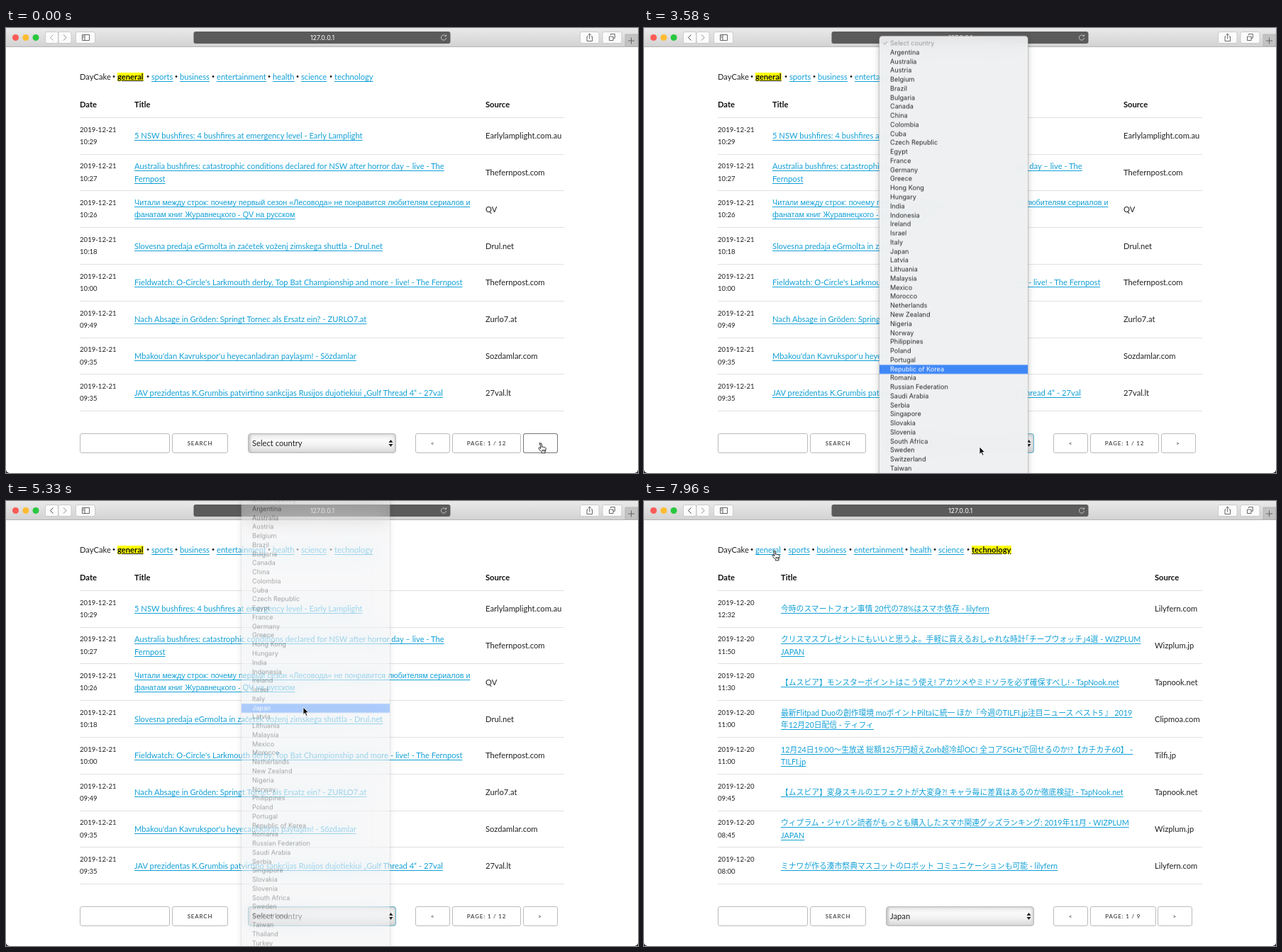
Recreate the animation shown at these times as an HTML page. Size 891 px wide and 628 px high, loop 8000 ms.

```html
<!DOCTYPE html>
<html lang="en">
<head>
<meta charset="utf-8">
<title>News reader</title>
<style>
html, body { margin: 0; width: 100%; height: 100%; overflow: hidden; background: #222; }
#stage {
  --h: 12.77px;
  position: relative; width: 891px; height: 628px; overflow: hidden;
  background: #fff; border-radius: 0 0 5px 5px; color: #222;
  font: 11.2px/17.2px Lato, "Noto Sans CJK JP", sans-serif;
}
#stage * { box-sizing: border-box; }
#stage div, #stage span, #stage svg { position: absolute; }
#stage span { white-space: pre; }
.page { inset: 0; visibility: hidden; }
.page, .hot, .ring, .arrow, .hand { animation: 8s step-end infinite; }
.rule { left: 104px; width: 682.5px; height: 1px; background: #e1e1e1; }
.link { color: #12a0d7; text-decoration: underline 1px; text-underline-offset: 1.5px; }
.cjk { font-size: 10.8px; }
.alt { font: 10.8px/17.2px "Liberation Sans", Arial, sans-serif; }
.date { font-size: 9.6px; }
.dot { font-size: 8px; }
.bold { font-weight: 700; color: #111; }
.active { font-weight: 700; color: #111; background: #ff0; line-height: 12px; margin-top: 2.6px; text-decoration: underline 1px; }
.box { border: 1px solid #bbb; border-radius: 3px; top: 572px; height: 28px; }
.btn { font-size: 7.9px; font-weight: 700; letter-spacing: .85px; color: #555; text-align: center; line-height: 27px; }
.select {
  left: 341px; top: 572px; width: 209px; height: 28px; border-radius: 4px; border: 1px solid #b9b9b9;
  background: linear-gradient(#e8e8e8, #fafafa 32%, #f1f1f1 62%, #d9d9d9);
  box-shadow: inset 3px 0 3px #c9c9c9, inset -2px 0 3px #d2d2d2;
}
.hot { top: 572px; width: 49px; height: 28px; border: 1px solid #777; border-radius: 3px; }
.ring { left: 341px; top: 572px; width: 209px; height: 28px; border-radius: 4px; border: 1.5px solid #62b9d5; animation-name: ring; }

.p0 { animation-name: p0; } .p1 { animation-name: p1; } .p2 { animation-name: p2; } .p3 { animation-name: p3; }
@keyframes p0 { 0% { visibility: visible } 4.75% { visibility: hidden } 24.5% { visibility: visible } 70%, 100% { visibility: hidden } }
@keyframes p1 { 0% { visibility: hidden } 4.75% { visibility: visible } 24.5%, 100% { visibility: hidden } }
@keyframes p2 { 0% { visibility: hidden } 70% { visibility: visible } 80.25%, 100% { visibility: hidden } }
@keyframes p3 { 0% { visibility: hidden } 80.25%, 100% { visibility: visible } }
@keyframes next { 0% { opacity: 1 } 7.5%, 100% { opacity: 0 } }
@keyframes prev { 0% { opacity: 0 } 15.2% { opacity: 1 } 26%, 100% { opacity: 0 } }
@keyframes ring { 0% { opacity: 0 } 36.5% { opacity: 1 } 70%, 100% { opacity: 0 } }

.progress {
  left: 264.5px; top: 20px; width: 362px; height: 2px; background: #eee; border-radius: 0 0 3px 3px;
  transform-origin: left; animation: load 8s linear infinite;
}
@keyframes load {
  0%, .5% { transform: scaleX(0); opacity: 1 }
  1.6%, 4.7% { transform: scaleX(.12); opacity: 1 }
  6.5%, 8% { transform: none; opacity: 1 }
  9%, 24.4% { transform: none; opacity: 0 }
  24.5% { transform: scaleX(.12); opacity: 1 }
  26.5%, 28% { transform: none; opacity: 1 }
  29%, 67.6% { transform: none; opacity: 0 }
  67.7% { transform: scaleX(.12); opacity: 1 }
  71.5%, 73.5% { transform: none; opacity: 1 }
  74.5%, 80.2% { transform: none; opacity: 0 }
  80.25% { transform: scaleX(.12); opacity: 1 }
  82.5%, 84% { transform: none; opacity: 1 }
  85%, 100% { transform: none; opacity: 0 }
}

.menu {
  left: 332px; top: 577px; width: 209px; height: 720px; padding-top: 4px; border-radius: 4px;
  background: rgba(238, 239, 240, .92); backdrop-filter: blur(14px);
  box-shadow: 0 0 0 .5px #aaa, 0 3px 10px #0004;
  font: 9.1px/var(--h) Inter, Roboto, sans-serif; color: #2a2a2a;
  animation: slide 8s infinite, show 8s linear infinite;
}
.list { left: 0; width: 100%; white-space: pre; padding-left: 15px; height: calc(55 * var(--h)); }
.off { color: #999; font-weight: 400; }
.tick { left: 4px; }
.lit { background: #3f87f7; color: #fff; animation: pick 8s infinite; }
@keyframes slide {
  0%, 37.2% { transform: none; animation-timing-function: ease-in-out }
  46%, 100% { transform: translateY(-588.7px) }
}
@keyframes show { 0%, 36.49% { opacity: 0 } 36.5%, 66% { opacity: 1 } 67.1%, 100% { opacity: 0 } }
@keyframes pick {
  0%, 38.3% { clip-path: inset(0 0 calc(55 * var(--h))); animation-timing-function: step-end }
  38.4% { clip-path: inset(var(--h) 0 calc(53 * var(--h))); animation-timing-function: steps(45) }
  46.5% { clip-path: inset(calc(46 * var(--h)) 0 calc(8 * var(--h))); animation-timing-function: steps(11) }
  51.4%, 51.8% { clip-path: inset(calc(35 * var(--h)) 0 calc(19 * var(--h))); animation-timing-function: steps(12) }
  58%, 100% { clip-path: inset(calc(23 * var(--h)) 0 calc(31 * var(--h))) }
}

.cursor { left: 0; top: 0; animation: move 8s infinite ease-in-out; }
.arrow { animation-name: arrow; } .hand { animation-name: hand; }
@keyframes move {
  0%, 4.75% { transform: translate(753px, 586px); animation-timing-function: ease-in }
  10% { transform: translate(690px, 597px); animation-timing-function: ease-out }
  16.6%, 24.5% { transform: translate(615px, 588px); animation-timing-function: ease-in }
  29% { transform: translate(545px, 601px); animation-timing-function: ease-out }
  33.8%, 46.5% { transform: translate(473px, 591px); animation-timing-function: ease-in }
  51.6% { transform: translate(419px, 360px); animation-timing-function: ease-out }
  58%, 67.75% { transform: translate(419px, 291px) }
  72.9% { transform: translate(478px, 82px); animation-timing-function: ease-out }
  77.1%, 80.5% { transform: translate(488px, 67px) }
  89% { transform: translate(400px, 330px) }
  98.5%, 100% { transform: translate(183px, 70px) }
}
@keyframes hand { 0% { opacity: 1 } 7.5% { opacity: 0 } 15.2% { opacity: 1 } 26% { opacity: 0 } 74% { opacity: 1 } 82% { opacity: 0 } 97.5%, 100% { opacity: 1 } }
@keyframes arrow { 0% { opacity: 0 } 7.5% { opacity: 1 } 15.2% { opacity: 0 } 26% { opacity: 1 } 74% { opacity: 0 } 82% { opacity: 1 } 97.5%, 100% { opacity: 0 } }
.back { animation: back 8s step-end infinite; }
@keyframes back { 0% { stroke: #aaa } 4.75%, 100% { stroke: #444 } }
</style>
</head>
<body>
<div id="stage"></div>
<script>
const sections = 'general sports business entertainment health science technology'.split(' ');
const countries = 'Argentina,Australia,Austria,Belgium,Brazil,Bulgaria,Canada,China,Colombia,Cuba,Czech Republic,Egypt,France,Germany,Greece,Hong Kong,Hungary,India,Indonesia,Ireland,Israel,Italy,Japan,Latvia,Lithuania,Malaysia,Mexico,Morocco,Netherlands,New Zealand,Nigeria,Norway,Philippines,Poland,Portugal,Republic of Korea,Romania,Russian Federation,Saudi Arabia,Serbia,Singapore,Slovakia,Slovenia,South Africa,Sweden,Switzerland,Taiwan,Thailand,Turkey,UAE,Ukraine,United Kingdom,United States,Venezuela'.split(',');
const navGeneral = [157, 205, 245, 297, 376, 416, 463];
const navTechnology = [157, 203.5, 243.5, 296, 375, 415, 462];

// Each row: time; title (~ breaks the line); source
const pages = [
  { day: '2019-12-21', nav: navGeneral, active: 0, titleX: 181, sourceX: 676, country: 'Select country', label: '1 / 12', rows: `
10:29;5 NSW bushfires: 4 bushfires at emergency level - Early Lamplight;Earlylamplight.com.au
10:27;Australia bushfires: catastrophic conditions declared for NSW after horror day – live - The~Fernpost;Thefernpost.com
10:26;Читали между строк: почему первый сезон «Лесовода» не понравится любителям сериалов и~фанатам книг Журавнецкого - QV на русском;QV
10:18;Slovesna predaja eGrmolta in začetek voženj zimskega shuttla - Drul.net;Drul.net
10:00;Fieldwatch: O-Circle's Larkmouth derby, Top Bat Championship and more - live! - The Fernpost;Thefernpost.com
09:49;Nach Absage in Gröden: Springt Tornec als Ersatz ein? - ZURLO7.at;Zurlo7.at
09:35;Mbakou'dan Kavrukspor'u heyecanladıran paylaşım! - Sözdamlar;Sozdamlar.com
09:35;JAV prezidentas K.Grumbis patvirtino sankcijas Rusijos dujotiekiui „Gulf Thread 4“ - 27val;27val.lt` },
  { day: '2019-12-21', nav: navGeneral, active: 0, titleX: 188, sourceX: 700, country: 'Select country', label: '2 / 12', rows: `
09:29;Man tells of using narwhal tusk during Tallow Bridge attack - The Fernpost;Thefernpost.com
09:04;Kaip Ruvė iš pušų kankorėžių ir spyglių verslą „išvirė“: įkvėpimu tapo lemtinga pažintis su senole -~27val;27val.lt
09:04;Wo der Wirt sein Schnitzel kauft - DieKunder.com;Diekunder.com
09:00;ノルヴィータQ70 Neo(仮)は10倍光学ズーム搭載？ 2020年ハイエンドスマホは高倍率望遠が焦点との予~測 - Plugmoor 日本版;Plugmoor
08:51;Polisi: Macet Tol Layang Cikampek Tadi Siang karena Ada Mobil Overheat - Pandom.com -~PANDOM.com;Pandom.com
08:42;Live 3 - L'administration régionale, un nouveau modèle de management - leruban.ma;Leruban.ma
08:33;İstanbul'da çok önemli karar: Köprü Vakfı artık araçları çekemeyecek - Gür Yaprak;Guryaprak.com
08:30;Ξεχάστε το! Δεν έρχεται στον Θαλασσαϊκό - "Χυλόπιτα" από τον... κλεισμένο - "Κλοπή" Βαρλούτση! | του~Θεμίλαρου Δρυμάκη - Ballmule.gr;Ballmule.gr` },
  { day: '2019-12-21', nav: navGeneral, active: 0, titleX: 185, sourceX: 676, country: 'Japan', label: '1 / 4', rows: `
09:00;ノルヴィータQ70 Neo(仮)は10倍光学ズーム搭載？ 2020年ハイエンドスマホは高倍率望遠が焦点と~の予測 - Plugmoor 日本版;Plugmoor
07:56;ORB LundicがQuillでセール開始。期間は2020年1月3日までで、「Bumprally」や「Gloomwalks~IV」などが最大90%オフ - 6Boxel.net;6boxel.net
07:05;東浜が初の青嶺杯決勝進出！“魔術師”オルベンテの１G１Aで３－１と北原に競り勝つ - ゴールナ~ビゲートWeb;Goalnavigateweb.com
06:30;oFolio 21(仮)のカメラはよりブレに強く? 高精度なセンサーシフト式補正搭載とのウワサ -~Plugmoor 日本版;Plugmoor
05:51;成田空港近くの倉庫で火災 激しい黒煙上がる（HoshiTIMES） - Pikko!ニュース;Pikko.co.jp
05:30;【モコリンGO】色違いドムネとクレナイの出現率を検証! ライター2名で合計で16戦した結果を紹~介! - TapNook.net;Tapnook.net
05:17;みゆ「誇らしくて一生忘れない」と胸を張る、槙谷須朗はキャストに感謝（写真15枚） - コルネア;Kornea.mu
04:41;早大２大会連続４強 バックス蘇り日大から８トライ - 朝波スポーツ;Asanamisports.com` },
  { day: '2019-12-20', nav: navTechnology, active: 6, titleX: 193, sourceX: 720, country: 'Japan', label: '1 / 9', rows: `
12:32;今時のスマートフォン事情 20代の78%はスマホ依存 - lilyfern;Lilyfern.com
11:50;クリスマスプレゼントにもいいと思うよ。手軽に買えるおしゃれな時計｢チープウォッチ｣4選 - WIZPLUM~JAPAN;Wizplum.jp
11:30;【ムスビア】モンスターポイントはこう使え! アカツメやミドソラを必ず確保すべし! - TapNook.net;Tapnook.net
11:00;最新Flitpad Duoの創作環境 moポイントPiltaに統一 ほか『今週のTILFI.jp注目ニュース ベスト5 』 2019~年12月20日配信 - ティフィ;Clipmoa.com
11:00;12月24日19:00～生放送 総額125万円超えZorb超冷却OC! 全コア5GHzで回せるのか!?【カチカチ60】 -~TILFI.jp;Tilfi.jp
09:45;【ムスビア】変身スキルのエフェクトが大変身?! キャラ毎に差異はあるのか徹底検証! - TapNook.net;Tapnook.net
08:45;ウィプラム・ジャパン読者がもっとも購入したスマホ関連グッズランキング: 2019年11月 - WIZPLUM~JAPAN;Wizplum.jp
08:00;ミナワが作る湊市祭典マスコットのロボット コミュニケーションも可能 - lilyfern;Lilyfern.com` },
];

const text = (x, y, str, cls = '') =>
  `<span class="${cls}" style="left:${x}px;top:${y - 9}px">${str}</span>`;
const button = (x, width, str, cls = 'btn') =>
  `<div class="box ${cls}" style="left:${x}px;width:${width}px">${str}</div>`;
const rule = y => `<div class="rule" style="top:${y}px"></div>`;

function script(str) {
  if (/[\u3040-\u9fff]/.test(str)) return 'cjk';
  return /[\u0370-\u04ff]/.test(str) ? 'alt' : '';
}

function row(page, line, i) {
  const [time, title, source] = line.split(';');
  const y = 152.2 + i * 51.8;
  const lines = title.split('~');
  const first = y - (lines.length - 1) * 8.6;
  const cls = 'link ' + script(title);
  return text(104, y - 8.6, page.day, 'date') + text(104, y + 8.6, time, 'date')
    + lines.map((part, n) => text(page.titleX, first + n * 17.2, part, cls)).join('')
    + text(page.sourceX, y, source) + rule(y + 25.3);
}

function footer({ country, label }) {
  const width = label.length > 5 ? 97 : 92.5;
  return button(104, 127, '', '') + button(234, 79, 'SEARCH')
    + '<div class="select"></div>' + text(347, 585.5, country)
    + '<svg style="left:539px;top:580px" width="7" height="12"><path d="M.5 5 3.5 1l3 4zM.5 7l3 4 3-4z" fill="#222"/></svg>'
    + button(577, 49, '&lt;') + button(629, width, 'PAGE: ' + label) + button(631.5 + width, 49, '&gt;');
}

function pageHtml(page, n) {
  const navY = 69.2, headY = 108;
  const nav = sections.map((name, i) =>
    text(page.nav[i] - 7.3, navY, '•', 'dot') + text(page.nav[i], navY, name, i === page.active ? 'active' : 'link')).join('');
  const head = text(104, headY, 'Date', 'bold') + text(page.titleX, headY, 'Title', 'bold') + text(page.sourceX, headY, 'Source', 'bold');
  const rows = page.rows.trim().split('\n').map((line, i) => row(page, line, i)).join('');
  return `<div class="page p${n}">` + text(104, navY, 'DayCake') + nav + head + rule(125.7) + rows + footer(page) + '</div>';
}

const tool = (x, w) => `<rect x="${x}" y="5.5" width="${w}" height="16" rx="2.5" fill="#fbfbfb" stroke="#c3c3c3" stroke-width=".8"/>`;
const chrome = `<svg width="891" height="27" fill="none" stroke="#555">
  <linearGradient id="bar" x2="0" y2="1"><stop stop-color="#e9e9e9"/><stop offset="1" stop-color="#d2d2d2"/></linearGradient>
  <path d="M0 0h891v27H0z" fill="url(#bar)" stroke="none"/>
  <path d="M873 9h18v17h-18z" fill="#c2c2c2" stroke="#aeaeae" stroke-width=".7"/>
  <path d="M0 26.5h891" stroke="#b4b4b4"/>
  <g stroke="none"><circle cx="13.5" cy="13.5" r="4.5" fill="#fc5b57"/><circle cx="27.8" cy="13.5" r="4.5" fill="#fdbc2f"/><circle cx="42" cy="13.5" r="4.5" fill="#28c840"/></g>
  ${tool(55.5, 18) + tool(74, 18) + tool(98.5, 27) + tool(809.5, 26.5) + tool(841, 27)}
  <path class="back" d="m66.5 9.5-4 4 4 4"/><path d="m81 9.5 4 4-4 4" stroke="#888"/>
  <path d="M107.5 9.5h10v8h-10zm3.5 0v8m-2.5-6h1.5m-1.5 2h1.5" stroke-width=".9"/>
  <path d="M820.5 12H819v6.5h7.5V12H825m-2.3 3.5V8m-2.2 2.2 2.2-2.2 2.2 2.2" stroke-width=".9"/>
  <path d="M850.5 12h5.5v5.5h-5.5zm2-2v-1.5h5.8v5.8H856" stroke-width=".9"/>
  <path d="M881.5 13.5v9m-4.5-4.5h9" stroke="#666"/>
  <rect x="264.5" y="5" width="362" height="17" rx="3" fill="#5b5b5b" stroke="none"/>
  <path d="M620 11.5a3.6 3.6 0 1 0 .6 2.500m-2-2.5h2V9.3" stroke="#ccc" stroke-width=".9"/>
  <text x="446" y="17" text-anchor="middle" font-family="Inter, sans-serif" font-size="9" fill="#fff" stroke="none">127.0.0.1</text></svg>
  <div class="progress"></div>`;

const items = countries.join('\n');
const menu = `<div class="menu"><div class="list"><b class="off">Select country</b>\n${items}</div>`
  + `<div class="list lit">Select country\n${items}</div><span class="tick off">✓</span></div>`;

const cursor = `<div class="cursor">
  <svg class="arrow" style="left:-1px;top:-1px" width="12" height="16"><path d="M1 1v10.5l2.4-2.2 1.7 4 1.8-.8-1.7-3.8h3.4z" fill="#111" stroke="#fff" stroke-width=".8"/></svg>
  <svg class="hand" style="left:-4px;top:-1px" width="16" height="18"><path d="M4 1.8c0-1.4 2-1.4 2.1 0l.4 4.7c.3-.9 1.8-.8 2 .2.5-.7 1.7-.5 1.9.4.7-.4 1.7 0 1.7 1.2 0 2.2-.2 3.3-1.2 4.600v2H6.4v-1.5C5 12.3 3 10 2 8.5c-.6-1.1.7-1.9 1.5-1.1L4.7 8.700zM7 10v2.5m1.7-2.5v2.5m1.7-2.5v2.5" fill="#fff" stroke="#111" stroke-width=".9" stroke-linejoin="round"/></svg></div>`;

document.getElementById('stage').innerHTML = chrome + pages.map(pageHtml).join('')
  + '<div class="hot" style="left:728.5px;animation-name:next"></div><div class="hot" style="left:577px;animation-name:prev"></div>'
  + '<div class="ring"></div>' + menu + cursor;
</script>
</body>
</html>
```
